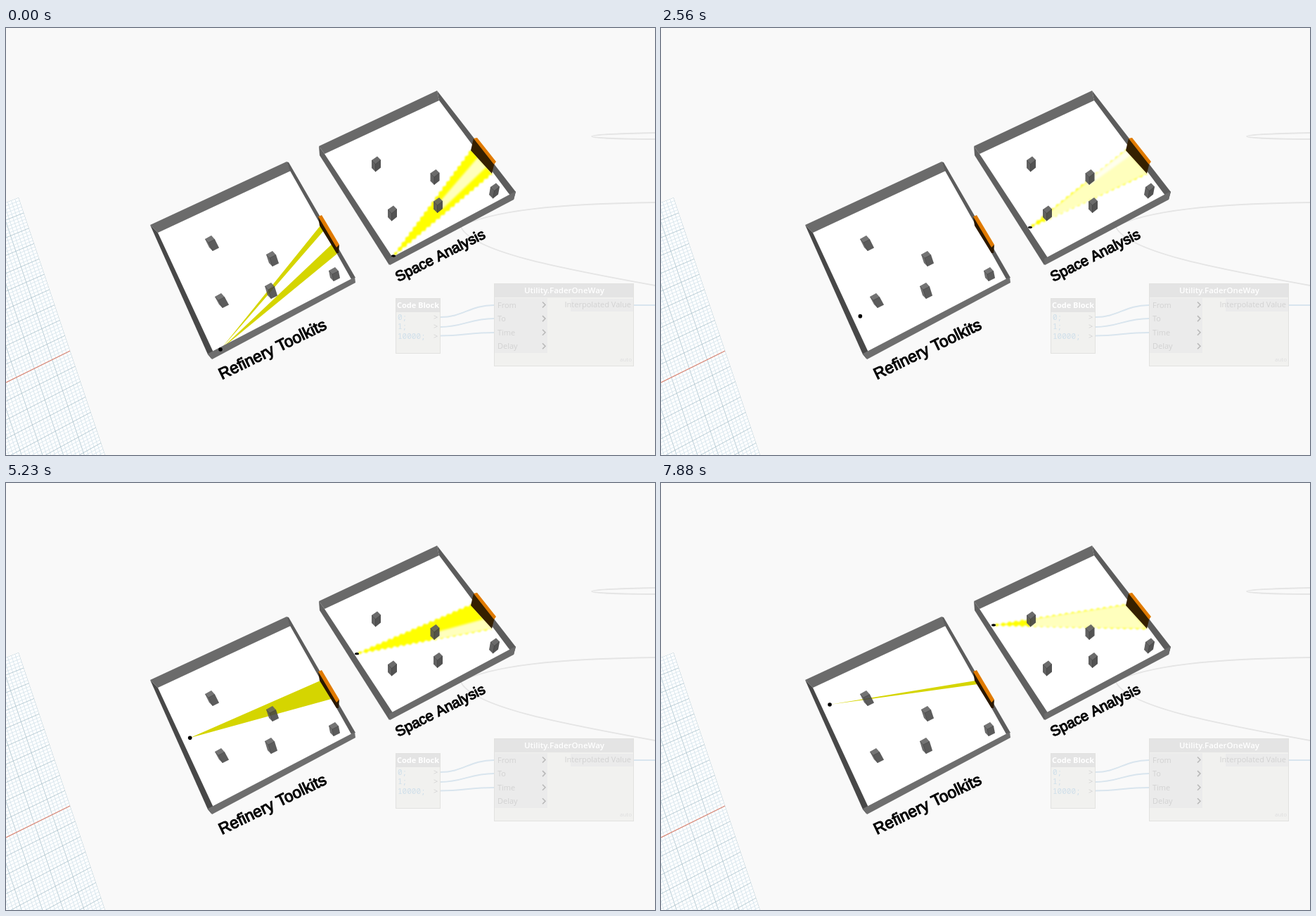
An HTML page with a canvas that plays this animation: 923 by 607 pixels, repeating every 8 s.

```html
<!DOCTYPE html>
<html>
<head>
<meta charset="utf-8">
<style>
html, body { margin: 0; width: 100%; height: 100%; overflow: hidden; background: #f9f9f9; }
canvas { display: block; }
</style>
</head>
<body>
<canvas id="stage" width="923" height="607"></canvas>
<script>
const ctx = document.getElementById('stage').getContext('2d');
const LOOP = 8000, STEPS = 21;
// Moments when the viewer advances; the right room follows after a short lag.
const times = [380, 740, 1110, 1490, 1800, 2190, 2560, 2940, 3300, 3670, 4050,
  4420, 4800, 5180, 5540, 5850, 6210, 6570, 6950, 7490, 7810];
const lags = { 1800: 120, 2190: 50, 3300: 120, 3670: 60, 4050: 50, 4420: 130,
  4800: 50, 5180: 50, 5850: 50, 7810: 70 };

const left = {
  from: [305, 457], to: [240, 315], wallA: [447, 281], wallB: [472, 320],
  base: [[-7, 0], [2, -5], [7, .5], [-2, 5]],
  boxes: [[379, 380, -4, -13], [381, 334, -4, -12], [310, 393, -6, -11], [296, 312, -6, -12], [468, 355, -2, -10]]
};
const right = {
  from: [551, 324], to: [473, 202], wallA: [662, 173], wallB: [691, 207],
  base: [[-6.5, 0], [1.5, -5.5], [6.5, -.5], [-1, 5.5]],
  boxes: [[614.5, 257.5, 0, -11], [610, 217.5, 0, -11], [549.5, 269, 0, -11], [526.5, 199, 0, -11], [693.5, 237, 2, -11]]
};

const mix = (a, b, k) => [a[0] + (b[0] - a[0]) * k, a[1] + (b[1] - a[1]) * k];
const sub = (a, b) => [a[0] - b[0], a[1] - b[1]];
const cross = (a, b) => a[0] * b[1] - a[1] * b[0];

function poly(fill, ...pts) {
  ctx.fillStyle = fill;
  ctx.beginPath();
  pts.forEach(p => ctx.lineTo(p[0], p[1]));
  ctx.closePath();
  ctx.fill();
}
function path(color, width, d) {
  ctx.strokeStyle = color;
  ctx.lineWidth = width;
  ctx.stroke(new Path2D(d));
}
function label(s, x, y, color, font, align = 'left') {
  ctx.fillStyle = color;
  ctx.font = font;
  ctx.textAlign = align;
  ctx.fillText(s, x, y);
}
function dot(p, rx, ry) {
  ctx.fillStyle = '#000';
  ctx.beginPath();
  ctx.ellipse(p[0], p[1], rx, ry, 0, 0, 7);
  ctx.fill();
}

function grid() {
  ctx.save();
  ctx.beginPath();
  [[0, 248], [18, 241], [141, 607], [0, 607]].forEach(p => ctx.lineTo(...p));
  ctx.clip();
  poly('#fdfeff', [0, 240], [150, 240], [150, 607], [0, 607]);
  for (let i = 0; i < 90; i++) {
    const color = i % 5 ? '#d3e3ea' : '#a9c0cb', y = 241 + i * 4.36;
    const x = 18 + (y - 241) * .336, slope = .39 + (y - 241) * .00048;
    path(color, .8, `M${x} ${y}L0 ${y + x * slope}`);
    if (i < 28) path(color, .8, `M${18 - i * 5.2} ${241 + i * 2.2}l168 500`);
  }
  path('#e08a78', 1.2, 'M0 504L91 459');
  ctx.restore();
}

function nodes() {
  const wire = '#d9e5ee', port = '#d2d2d2', code = '#cfdfea';
  path('#e5e5e5', 1.8, 'M923 149C870 150 833 152 833 154S870 158 923 158');
  path('#e5e5e5', 1.8, 'M640 285C690 258 790 250 923 248');
  path('#e5e5e5', 1.8, 'M646 281C660 318 790 342 923 366');

  ctx.fillStyle = '#f1f1ef';
  ctx.fillRect(554, 384, 64, 79);
  ctx.fillRect(694, 363, 199, 118);
  ctx.fillStyle = '#e4e4e4';
  ctx.fillRect(554, 384, 64, 20);
  ctx.fillRect(694, 363, 199, 20);
  ctx.fillStyle = '#ebebeb';
  ctx.fillRect(694, 384, 76, 78);
  ctx.fillRect(803, 385, 90, 18);
  ctx.strokeStyle = '#e2e2e0';
  ctx.lineWidth = 1;
  ctx.strokeRect(554.5, 384.5, 63, 78);
  ctx.strokeRect(694.5, 363.5, 198, 117);

  label('Code Block', 586, 398, '#fff', 'bold 11px "Open Sans", sans-serif', 'center');
  label('Utility.FaderOneWay', 794, 377, '#fff', '600 11.5px "Open Sans", sans-serif', 'center');
  ['0;', '1;', '10000;'].forEach((s, i) => {
    const y = 415 + i * 13.3;
    label(s, 557, y, code, '11px "Noto Sans Mono", monospace');
    label('>', 608, y, port, '11px "Open Sans", sans-serif');
  });
  ['From', 'To', 'Time', 'Delay'].forEach((s, i) => {
    const y = 393.5 + i * 19.6;
    label(s, 699, y + 4, port, '11px "Open Sans", sans-serif');
    path('#b8b8b8', 1.5, `M763 ${y - 4}l4 4l-4 4`);
  });
  label('Interpolated Value', 889, 397, port, '11px "Open Sans", sans-serif', 'right');
  label('auto', 890, 474, '#dedede', '8px "Open Sans", sans-serif', 'right');
  path(wire, 2, 'M618 411C650 411 660 394 694 394');
  path(wire, 2, 'M618 425C650 425 660 413 694 413');
  path(wire, 2, 'M618 437.5C650 437.5 660 433 694 433');
  path(wire, 2, 'M893 394H923');
}

function title(s, x, y, size, angle) {
  ctx.save();
  ctx.translate(x, y);
  ctx.rotate(angle);
  label(s, 0, 0, '#000', size + 'px "Liberation Sans", Arial, sans-serif');
  ctx.strokeStyle = '#000';
  ctx.lineWidth = 1.1;
  ctx.strokeText(s, 0, 0);
  ctx.restore();
}

const corners = (room, box) => room.base.map(c => [box[0] + c[0], box[1] + c[1]]);

// Part of the window hidden by a box, with the two corners that bound it.
function shadow(room, p, box) {
  const wall = sub(room.wallB, room.wallA);
  const hits = corners(room, box).map(q => {
    const d = sub(q, p);
    return { q, s: cross(sub(p, room.wallA), d) / cross(wall, d) };
  }).sort((a, b) => a.s - b.s);
  return { lo: hits[0], hi: hits[3] };
}
const shadows = (room, p) => room.boxes.map(b => shadow(room, p, b))
  .filter(h => h.hi.s > 0 && h.lo.s < 1).sort((a, b) => a.lo.s - b.lo.s);
const onWall = (room, s) => mix(room.wallA, room.wallB, Math.min(1, Math.max(0, s)));

function sharpBeam(room, p) {
  let s = 0;
  const ray = end => {
    if (end - s > .008) poly('#d5d500', p, onWall(room, s), onWall(room, end));
  };
  for (const h of shadows(room, p)) {
    ray(h.lo.s);
    s = Math.max(s, h.hi.s);
  }
  ray(1);
}

function ragged(p, end, side) {
  const d = sub(end, p), len = Math.hypot(...d), n = Math.round(len / 4.5);
  return Array.from({ length: n + 1 }, (_, i) => {
    const off = side * (i % 2 ? 1.8 : -1) / len, q = mix(p, end, i / n);
    return [q[0] + d[1] * off, q[1] - d[0] * off];
  });
}
function softBeam(room, p) {
  ctx.save();
  ctx.filter = 'blur(0.8px)';
  poly('#ff0', ...ragged(p, room.wallA, 1), ...ragged(p, room.wallB, -1).reverse());
  ctx.filter = 'blur(1.6px)';
  for (const { lo, hi } of shadows(room, p))
    poly('rgba(255,255,255,.74)', lo.q, onWall(room, lo.s), onWall(room, hi.s), hi.q);
  ctx.restore();
}

function drawBox(room, box, alpha) {
  const b = corners(room, box), t = b.map(c => [c[0] + box[2], c[1] + box[3]]);
  poly(`rgba(80,80,80,${alpha})`, b[0], b[3], b[2], t[2], t[1], t[0]);
  poly('rgba(30,30,30,.2)', b[3], b[2], t[2], t[3]);
  poly('rgba(150,150,150,.2)', ...t);
  path('rgba(40,40,40,.45)', .7, `M${t[0]}L${t[3]}L${t[2]}M${t[3]}L${b[3]}`);
}

function leftRoom(p) {
  poly('#fff', [205, 281], [399, 190], [497, 357], [291, 467]);
  sharpBeam(left, p);
  left.boxes.forEach(b => drawBox(left, b, .84));
  poly('#6b6b6b', [205, 280], [399, 190], [405, 203], [216, 291]);
  poly('#484848', [205, 280], [216, 291], [295, 461], [292, 470], [287, 464]);
  poly('#5c5c5c', [399, 190], [402, 191], [497, 355], [491, 357], [404, 203]);
  poly('#6e6e6e', [287, 463], [496, 354], [497, 362], [293, 471]);
  poly('#2a1800', [444, 268], [470, 309], [474, 308], [473, 320], [470, 320], [446, 281]);
  poly('#e07a00', [444, 268], [449, 266], [474, 308], [470, 312]);
  dot(p, 2.8, 2.8);
}

function rightRoom(p) {
  poly('#fff', [445, 168], [613, 89], [725, 233], [546, 335]);
  softBeam(right, p);
  right.boxes.forEach(b => drawBox(right, b, .9));
  poly('#696969', [445, 168], [613, 89], [616, 103], [453, 179]);
  poly('#606060', [445, 168], [453, 179], [551, 328], [545, 337], [446, 181]);
  poly('#5c5c5c', [613, 89], [725, 233], [722, 244], [714, 234], [616, 103]);
  poly('#6b6b6b', [545, 328], [725, 232], [722, 244], [546, 337]);
  poly('#352000', [665, 157], [695, 191], [691, 207], [661, 174]);
  poly('#e07a00', [665, 157], [670, 156], [697, 190], [694, 194]);
  dot(p, 3, 1.7);
}

function draw(now) {
  const t = now % LOOP;
  const stepL = times.filter(s => t >= s).length;
  const stepR = times.filter(s => t >= s + (lags[s] || 0)).length;
  ctx.fillStyle = '#f9f9f9';
  ctx.fillRect(0, 0, 923, 607);
  grid();
  nodes();
  leftRoom(mix(left.from, left.to, stepL / STEPS));
  rightRoom(mix(right.from, right.to, stepR / STEPS));
  title('Refinery Toolkits', 307, 500, 22.8, -.452);
  title('Space Analysis', 558, 361, 20.5, -.468);
}

const start = performance.now();
function frame() {
  draw(performance.now() - start);
  requestAnimationFrame(frame);
}
frame();
</script>
</body>
</html>
```
